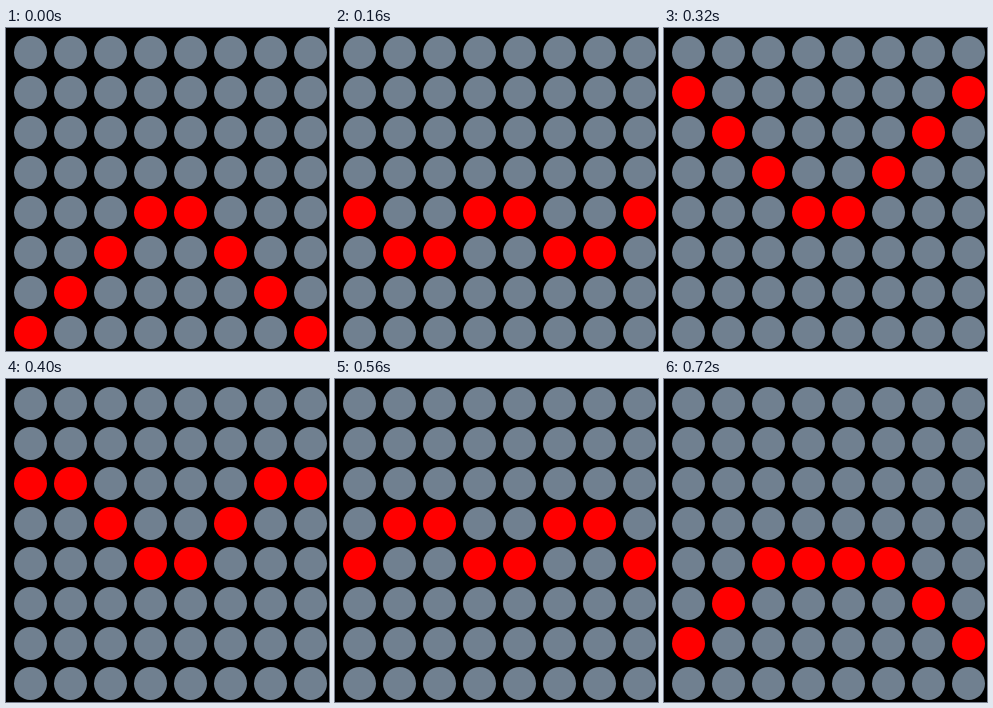
These frames come from a looping animation (323 px wide and 323 px high, 800 ms). An HTML page with a canvas:

```html
<!DOCTYPE html>
<html lang="en">
<head>
<meta charset="utf-8">
<title>Flapping dots</title>
<style>
  html, body { margin: 0; background: #000; overflow: hidden; }
  canvas { display: block; }
</style>
</head>
<body>
<canvas id="stage" width="323" height="323"></canvas>
<script>
  const ctx = document.getElementById('stage').getContext('2d');
  const SIZE = 8, PITCH = 40, FIRST = 24.5, RADIUS = 16.5, STEP_MS = 80;

  // Lit row of each column, from the wing tip to the body; the right wing mirrors it.
  const poses = [
    '7654', '6554', '4554', '2344', '1234',
    '2234', '2334', '4334', '5434', '6544'
  ];

  function draw(pose) {
    ctx.fillStyle = '#000';
    ctx.fillRect(0, 0, 323, 323);
    for (let col = 0; col < SIZE; col++) {
      const litRow = +pose[Math.min(col, SIZE - 1 - col)];
      for (let row = 0; row < SIZE; row++) {
        ctx.fillStyle = row === litRow ? '#f00' : '#708090';
        ctx.beginPath();
        ctx.arc(FIRST + col * PITCH, FIRST + row * PITCH, RADIUS, 0, 2 * Math.PI);
        ctx.fill();
      }
    }
  }

  function tick() {
    draw(poses[Math.floor(performance.now() / STEP_MS) % poses.length]);
    requestAnimationFrame(tick);
  }
  tick();
</script>
</body>
</html>
```
